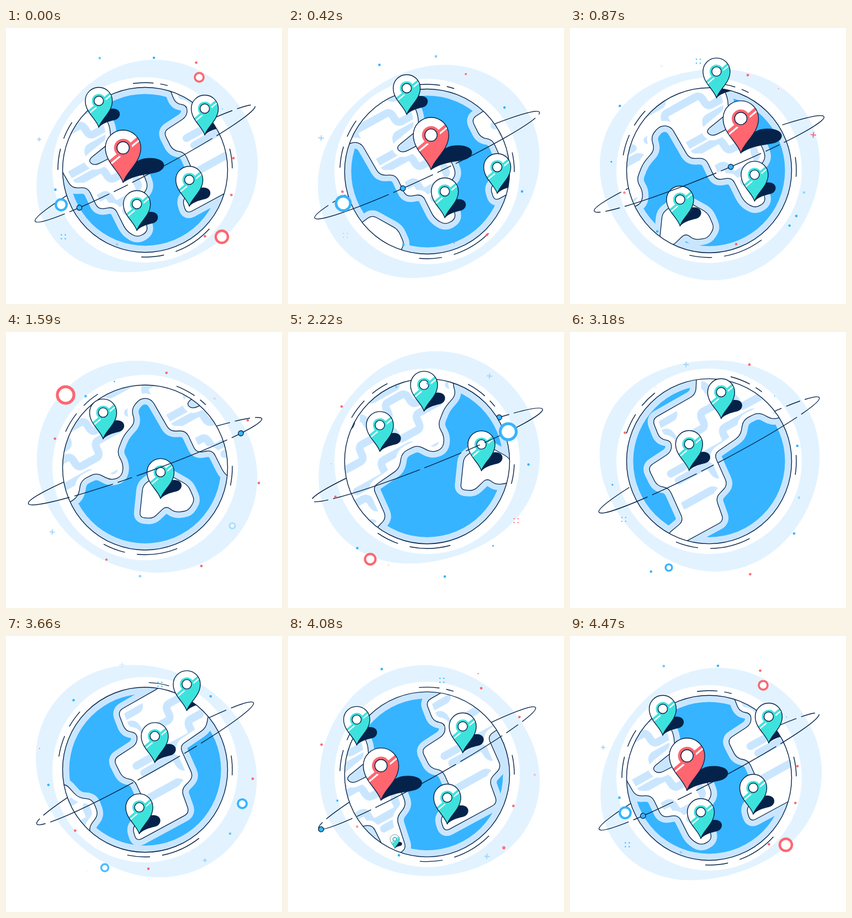
Recreate the animation shown at these times as an HTML page with a canvas. Size 500 px wide and 500 px high, loop 4500 ms.

```html
<!DOCTYPE html>
<html lang="en">
<head>
<meta charset="utf-8">
<title>Spinning globe with map pins</title>
<style>
  html, body { margin: 0; width: 100%; height: 100%; overflow: hidden; background: #fff; }
  canvas { display: block; width: 100vmin; height: 100vmin; }
</style>
</head>
<body>
<canvas id="stage" width="500" height="500"></canvas>
<script>
const ctx = document.getElementById('stage').getContext('2d');
const LOOP = 4470, HOLD = 30, TAU = Math.PI * 2, RAD = Math.PI / 180;
const NAVY = '#05234a', BLUE = '#36b4ff', SHELF = '#cae6ff', HALO = '#e2f3ff';
const PINK = '#ff6670', TEAL = '#3ee2dc', PALE = '#a3d5fa';
const CX = 252, CY = 245.5, R = 149.5;

// The map slides by one SHIFT per loop
const SHIFT = [500, -277], SPAN = Math.hypot(...SHIFT), TILT = Math.atan2(SHIFT[1], SHIFT[0]);

const wave = (t, peak) => Math.cos(TAU * (t - peak) / LOOP);
const globeY = t => CY + 14.5 * wave(t, 470);

function seeded(seed) {
  return () => {
    seed = (seed * 16807) % 2147483647;
    return seed / 2147483647;
  };
}

function disc(x, y, r, fill, stroke, width = 1.4) {
  ctx.beginPath();
  ctx.arc(x, y, r, 0, TAU);
  if (fill) { ctx.fillStyle = fill; ctx.fill(); }
  if (stroke) { ctx.strokeStyle = stroke; ctx.lineWidth = width; ctx.stroke(); }
}

function at(x, y, draw) {
  ctx.save();
  ctx.translate(x, y);
  draw();
  ctx.restore();
}

function clipToGlobe() {
  ctx.beginPath();
  ctx.arc(0, 0, R, 0, TAU);
  ctx.clip();
}

// Position on the sliding map, relative to the globe centre
const slide = (x, y, turns) => [x + turns * SHIFT[0] - CX, y + turns * SHIFT[1] - globeY(0)];

// Closed outline through "x,y x,y ..." with rounded corners
function outline(text, radius) {
  const pts = text.split(' ').map(pair => pair.split(',').map(Number));
  const path = new Path2D(), n = pts.length;
  const toward = (a, b) => {
    const d = Math.hypot(b[0] - a[0], b[1] - a[1]), k = Math.min(radius, d / 2) / d;
    return [a[0] + (b[0] - a[0]) * k, a[1] + (b[1] - a[1]) * k];
  };
  pts.forEach((v, i) => {
    path.lineTo(...toward(v, pts[(i + n - 1) % n]));
    path.quadraticCurveTo(...v, ...toward(v, pts[(i + 1) % n]));
  });
  path.closePath();
  return path;
}

const continent = outline(
  '-126,285 -128,333 -207,378 -193,414 -172,417 -172,437 -215,465 -198,499 -177,502 -150,562 -181,588 -173,614 ' +
  '-77,562 -92,520 -70,497 -95,441 -47,408 -42,379 -14,365 12,379 32,372 35,350 23,329 35,298 56,274 49,250 65,230 85,231 ' +
  '119,290 148,289 167,329 196,324 218,368 238,380 258,368 240,312 258,288 247,260 222,258 197,231 160,250 148,240 190,206 188,178 150,105', 11);
const island = outline('70,388 64,446 88,448 112,425 128,437 152,434 164,415 152,388 105,362', 9);
const lands = [continent, island];

// Meandering bands that run along the map's own axis
const rivers = new Path2D();
{
  const random = seeded(11), rise = 26, bend = 9;
  for (let row = -260; row <= 260; row += 44) {
    let x = -420, up = false;
    while (x < 420) {
      const length = 26 + 34 * random(), y = row + (up ? -rise : 0), next = row + (up ? 0 : -rise);
      rivers.moveTo(x, y);
      rivers.lineTo(x + length, y);
      x += length;
      if (random() < 0.7) {
        rivers.quadraticCurveTo(x + bend, y, x + bend, (y + next) / 2);
        rivers.quadraticCurveTo(x + bend, next, x + 2 * bend, next);
        x += 2 * bend;
        up = !up;
      } else x += 30;
    }
  }
}

function drawMap(p) {
  const tiles = draw => {
    for (let k = -1; k <= 1; k++) at(...slide(0, 0, p + k), draw);
  };
  const strokeLands = (color, width) => {
    ctx.strokeStyle = color;
    ctx.lineWidth = width;
    lands.forEach(land => ctx.stroke(land));
  };
  ctx.lineJoin = ctx.lineCap = 'round';
  disc(0, 0, R, SHELF);
  disc(0, 0, 137.5, BLUE);
  ctx.save();
  clipToGlobe();
  tiles(() => strokeLands(SHELF, 22));
  tiles(() => {
    ctx.fillStyle = '#fff';
    lands.forEach(land => ctx.fill(land));
    ctx.save();
    ctx.clip(continent);
    at(20, 365, () => {
      ctx.rotate(TILT);
      ctx.strokeStyle = SHELF;
      ctx.lineWidth = 14;
      ctx.stroke(rivers);
    });
    strokeLands('#fff', 18);
    ctx.restore();
    strokeLands(NAVY, 1.3);
  });
  ctx.restore();
  disc(0, 0, R, null, NAVY);
}

// Tips on the map plane
const pins = [[168, 180], [360, 194], [-2, 304], [332, 323], [-82, 377], [237, 367], [102, 412]]
  .map(([x, y]) => ({ x, y, color: TEAL, size: 1, reach: 1 }));
pins.push({ x: 212, y: 280, color: PINK, size: 1.31, reach: 1.95 });

const body = new Path2D('M0 0C-4-15-24.5-27-24.5-48A24.5 24.5 0 0 1 24.5-48C24.5-27 4-15 0 0Z');
const shadow = new Path2D('M0 0C6-20 10-34 25-34C42-34 42-16 28-13C16-10 8-8 0 0Z');

function drawPin({ color, size, reach }, x, y, scale) {
  ctx.save();
  clipToGlobe();
  ctx.translate(x, y);
  ctx.scale(scale * reach, scale * size);
  ctx.fillStyle = NAVY;
  ctx.fill(shadow);
  ctx.restore();
  at(x, y, () => {
    ctx.scale(scale * size, scale * size);
    ctx.fillStyle = '#fff';
    ctx.fill(body);
    ctx.save();
    ctx.clip(body);
    ctx.translate(0, -48);
    ctx.rotate(-40 * RAD);
    ctx.fillStyle = color;
    ctx.fillRect(-40, 1, 80, 90);
    ctx.fillStyle = '#fff';
    ctx.fillRect(-40, 5, 80, 2.4);
    disc(0, 0, 12.5, color);
    ctx.restore();
    ctx.strokeStyle = NAVY;
    ctx.lineWidth = 1.4 / size;
    ctx.stroke(body);
    disc(0, -48, 8.5, '#fff', NAVY, 1.4 / size);
  });
}

function popIn(u) {
  const v = Math.min(1, u) - 1;
  return 1 + 2.2 * v ** 3 + 1.2 * v ** 2;
}

// A pin pops up as its tip enters the globe and shrinks as it leaves
function drawPins(p) {
  const ux = Math.cos(TILT), uy = Math.sin(TILT);
  for (const pin of pins) for (let k = -1; k <= 1; k++) {
    const [x, y] = slide(pin.x, pin.y, p + k);
    const along = x * ux + y * uy, half = Math.sqrt(R * R - (x * uy - y * ux) ** 2);
    const since = (half + along) / SPAN * LOOP, left = (half - along) / SPAN * LOOP;
    if (since > 0 && left > 0)
      drawPin(pin, x, y, popIn(since / 330) * Math.min(1, left / 150));
  }
}

// Soft blob that wobbles twice per loop
function drawBlob(t) {
  const phase = TAU * 2 * t / LOOP;
  const lean = -2 + 13 * Math.cos(phase - 226 * RAD), lobe = Math.cos(phase + 25 * RAD);
  ctx.beginPath();
  for (let a = 0; a < TAU; a += 0.05) {
    const r = 195 + 3 * Math.cos(a) + 4 * Math.cos(2 * a) + lean * Math.sin(2 * a)
      + lobe * (5 * Math.sin(3 * a) + 2 * Math.cos(3 * a) - 3.5 * Math.sin(a));
    ctx.lineTo(r * Math.cos(a), r * Math.sin(a));
  }
  ctx.fillStyle = HALO;
  ctx.fill();
}

function drawArcs(t) {
  const sway = -wave(t, 0);
  const arc = (start, from, to) => {
    ctx.beginPath();
    ctx.arc(0, 0, 158, (start + from) * RAD, (start + to) * RAD);
    ctx.stroke();
  };
  ctx.strokeStyle = NAVY;
  ctx.lineWidth = 1.4;
  const left = 195 + 15 * sway, top = 280 + 18 * sway, bottom = 108.5 + 16 * sway;
  arc(left, 0, 14);
  arc(left, 21, 33);
  arc(top, 0, 13.5);
  arc(top, 18, 23);
  arc(bottom, -15, 0);
  arc(bottom, -50, -23);
  arc(-6 + 8 * sway, 0, 13);
}

// Orbit: arc length runs from the left tip along the front, then back behind
const A = 225, B = 20, GAP = 9;
const orbitLength = Math.PI * (3 * (A + B) - Math.sqrt((3 * A + B) * (A + 3 * B)));
const gaps = [61, 149, 186, 361, 459, 494, 668, 750, 786];
const dashes = gaps.flatMap((g, i) => [g - (i ? gaps[i - 1] + GAP : GAP / 2), GAP]);
dashes.push(orbitLength - gaps[gaps.length - 1] - GAP / 2, 0);

function orbitPoint(s) {
  const step = 0.004;
  let a = Math.PI;
  for (let run = 0; run < s; a -= step)
    run += step * Math.hypot(A * Math.sin(a), B * Math.cos(a));
  return [A * Math.cos(a), B * Math.sin(a)];
}

function drawOrbit(t, front) {
  const moved = t / LOOP * orbitLength, s = (moved + 84) % orbitLength;
  at(0, -11.5, () => {
    ctx.rotate(-(24.7 + 4.7 * wave(t, 3850)) * RAD);
    ctx.strokeStyle = NAVY;
    ctx.lineWidth = 1.4;
    ctx.lineCap = 'butt';
    ctx.setLineDash(dashes);
    ctx.lineDashOffset = (front ? 0 : orbitLength / 2) - moved;
    ctx.beginPath();
    ctx.ellipse(0, 0, A, B, 0, front ? Math.PI : 0, front ? 0 : -Math.PI, true);
    ctx.stroke();
    ctx.setLineDash([]);
    if (front === s < orbitLength / 2) disc(...orbitPoint(s), 4.7, BLUE, NAVY);
  });
}

// Confetti around the globe: each bit pops up, stays and fades around its time
const bits = [
  { time: 0, x: 350, y: 99, size: 8, color: PINK },
  { time: 0, x: 391, y: 388, size: 11, color: PINK },
  { time: 270, x: 100, y: 330, size: 13, color: BLUE },
  { time: 1240, x: 410, y: 351, size: 5, color: BLUE },
  { time: 1590, x: 108, y: 114, size: 15, color: PINK },
  { time: 2220, x: 149, y: 402, size: 9.5, color: PINK },
  { time: 2220, x: 399, y: 171, size: 14.5, color: BLUE },
  { time: 3420, x: 179, y: 417, size: 6.5, color: BLUE },
  { time: 3660, x: 428, y: 301, size: 8, color: BLUE },
].map(ring => ({ ...ring, kind: 'ring' }));
{
  const random = seeded(29), count = 66;
  for (let i = 0; i < count; i++) {
    const angle = i * 2.4, r = 160 + 50 * random(), time = i / count * LOOP;
    const x = CX + r * Math.cos(angle), y = CY + r * Math.sin(angle);
    const color = random() < 0.6 ? BLUE : PINK;
    if (i % 9 === 4)
      bits.push({ kind: 'cross', time, x, y, size: 5, color: color === BLUE ? PALE : PINK });
    else if (i % 14 === 1)
      for (let j = 0; j < 4; j++)
        bits.push({ kind: 'dot', time, x: x + j % 2 * 7, y: y + (j >> 1) * 7, size: 1.2, color });
    else bits.push({ kind: 'dot', time, x, y, size: 2.3, color });
  }
}

function drawBits(t) {
  const life = 840, drift = -0.85 * (globeY(t) - CY);
  for (const { time, kind, color, size, x, y } of bits) {
    const age = (t - time + life / 2 + LOOP) % LOOP;
    if (age >= life) continue;
    const r = size * Math.min(1, age / 200);
    ctx.globalAlpha = Math.min(1, (life - age) / 200);
    at(x, y + drift, () => {
      if (kind === 'dot') disc(0, 0, r, color);
      else if (kind === 'ring') disc(0, 0, r, '#fff', color, 2 + r * 0.22);
      else {
        ctx.rotate(0.1);
        ctx.strokeStyle = color;
        ctx.lineWidth = 1.9;
        ctx.beginPath();
        ctx.moveTo(-r, 0);
        ctx.lineTo(r, 0);
        ctx.moveTo(0, -r);
        ctx.lineTo(0, r);
        ctx.stroke();
      }
    });
  }
  ctx.globalAlpha = 1;
}

function frame(now) {
  const t = Math.min(LOOP, now % (LOOP + HOLD)), p = t / LOOP;
  ctx.fillStyle = '#fff';
  ctx.fillRect(0, 0, 500, 500);
  at(CX, globeY(t), () => {
    drawBlob(t);
    disc(0, 0, 168, '#fff');
    drawArcs(t);
    drawOrbit(t, false);
    drawMap(p);
    drawPins(p);
    drawOrbit(t, true);
  });
  drawBits(t);
}

const start = performance.now();
function tick() {
  frame(performance.now() - start);
  requestAnimationFrame(tick);
}
tick();
</script>
</body>
</html>
```
